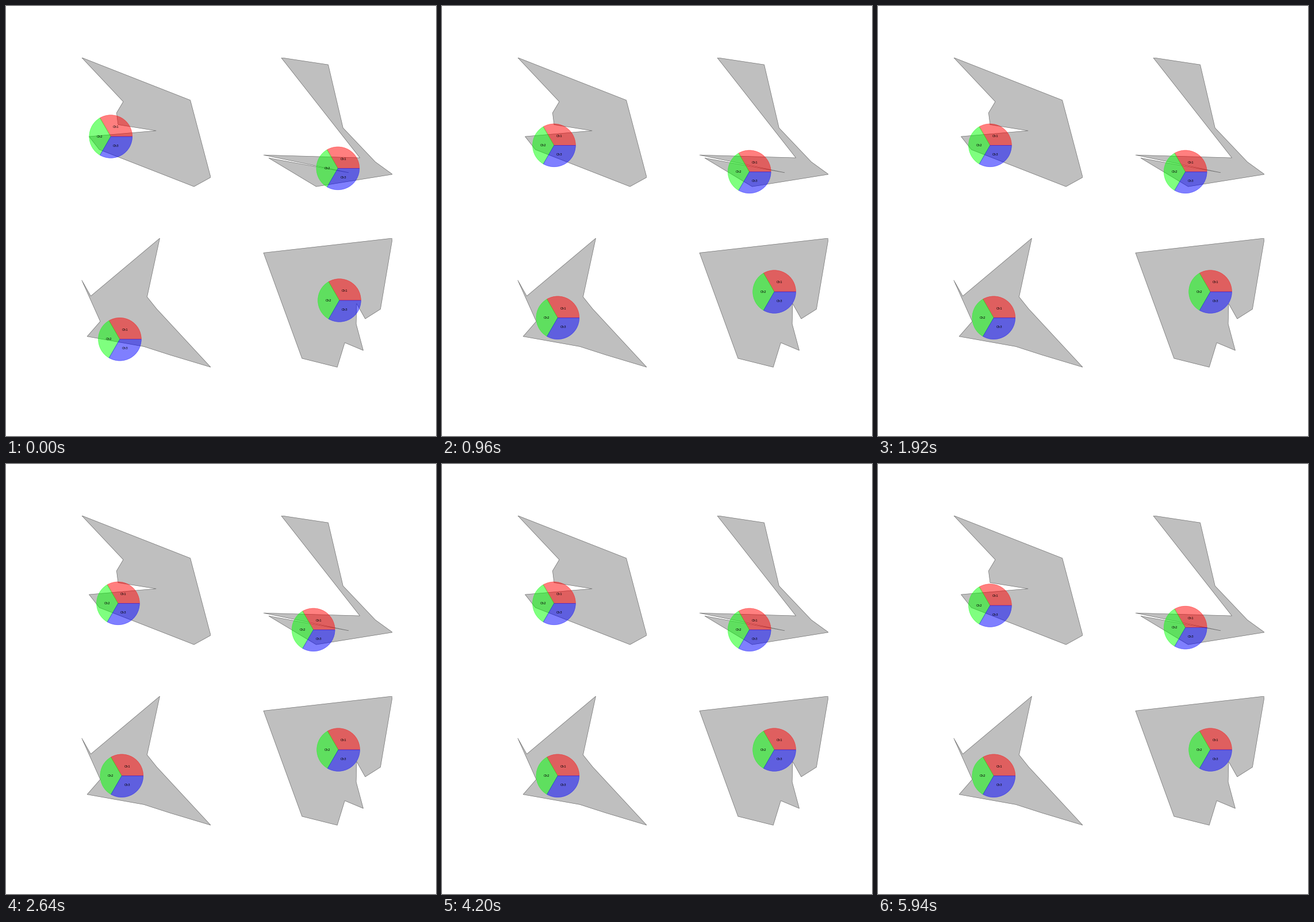
A matplotlib script that plays this animation: 748 by 748 pixels, repeating every 6 s.

```python
import numpy as np
import matplotlib.pyplot as plt
from matplotlib.animation import FuncAnimation
from matplotlib.patches import Polygon, Wedge

SIZE, DPI = 748, 50
FRAMES, INTERVAL = 100, 60
RADIUS = 1
STEP = 0.1
COLORS = ("red", "lime", "blue")


class Sensor:
    """Three-sector disc that walks to a resting place inside its region.

    Where the disc does not fit, it rocks up and down by one step.
    """

    def __init__(self, ax, region, start, rest, fits):
        ax.add_patch(Polygon(region, facecolor="gray", edgecolor="black",
                             alpha=0.5, lw=1))
        self.start, self.fits = np.array(start), fits
        self.path = np.array(rest) - self.start
        self.length = np.hypot(*self.path)
        self.wedges, self.labels = [], []
        for i, color in enumerate(COLORS):
            wedge = Wedge(start, RADIUS, 120 * i, 120 * (i + 1),
                          color=color, alpha=0.5, lw=1)
            self.wedges.append(ax.add_patch(wedge))
            self.labels.append(ax.text(*start, f"Ch{i + 1}", fontsize=8,
                                       ha="center", va="center"))

    def center(self, n):
        walked = n * STEP
        if walked < self.length:
            return self.start + self.path * walked / self.length
        rock = 0 if self.fits else -STEP * (n % 2)
        return self.start + self.path + (0, rock * self.rock_sign)

    @property
    def rock_sign(self):
        # rock back towards the side that pushed the disc here
        return 1 if self.path[1] < -0.3 else -1

    def place(self, n):
        pos = self.center(n)
        for i, (wedge, label) in enumerate(zip(self.wedges, self.labels)):
            angle = np.radians(60 + 120 * i)
            wedge.set_center(pos)
            label.set_position(pos + RADIUS / 2 *
                               np.array([np.cos(angle), np.sin(angle)]))
        return self.wedges + self.labels


plt.rcParams["font.family"] = "DejaVu Sans"
fig, axes = plt.subplots(2, 2, figsize=(SIZE / DPI, SIZE / DPI), dpi=DPI,
                         facecolor="white")
fig.subplots_adjust(left=0.125, right=0.9, bottom=0.11, top=0.88,
                    wspace=0.2, hspace=0.2)
for ax in axes.flat:
    ax.set(xlim=(-1, 6), ylim=(-1, 6), aspect="equal")
    ax.axis("off")

sensors = [
    Sensor(axes[0, 0],
           [(0, 6), (5.05, 4.02), (6, 0.43), (5.22, 0), (0.82, 1.72),
            (0.34, 2.33), (3.46, 2.6), (1.69, 2.88), (1.62, 3.43),
            (1.93, 3.95)],
           start=(1.35, 2.33), rest=(1.69, 1.92), fits=False),
    Sensor(axes[0, 1],
           [(0.82, 6), (3.01, 5.67), (3.7, 2.73), (5.2, 1.15), (6, 0.57),
            (2.45, 0), (0.24, 1.33), (3.96, 0.65), (0, 1.47), (4.48, 1.34)],
           start=(3.46, 0.85), rest=(2.32, 0.69), fits=False),
    Sensor(axes[1, 0],
           [(3.63, 6), (3.04, 3.27), (3.48, 2.72), (6, 0), (4.1, 0.57),
            (2.89, 0.96), (0.25, 1.43), (0.86, 2.13), (0, 4.05),
            (0.42, 3.31)],
           start=(1.77, 1.3), rest=(1.86, 2.3), fits=True),
    Sensor(axes[1, 1],
           [(0, 5.32), (6, 6), (5.44, 2.7), (4.73, 2.25), (4.33, 2.96),
            (4.31, 2.01), (4.64, 0.78), (3.78, 1.14), (3.43, 0),
            (1.79, 0.41)],
           start=(3.53, 3.11), rest=(3.48, 3.51), fits=True),
]


def update(n):
    return [artist for s in sensors for artist in s.place(n)]


anim = FuncAnimation(fig, update, frames=FRAMES, interval=INTERVAL,
                     repeat=True, repeat_delay=0, blit=False)
plt.show()
```
